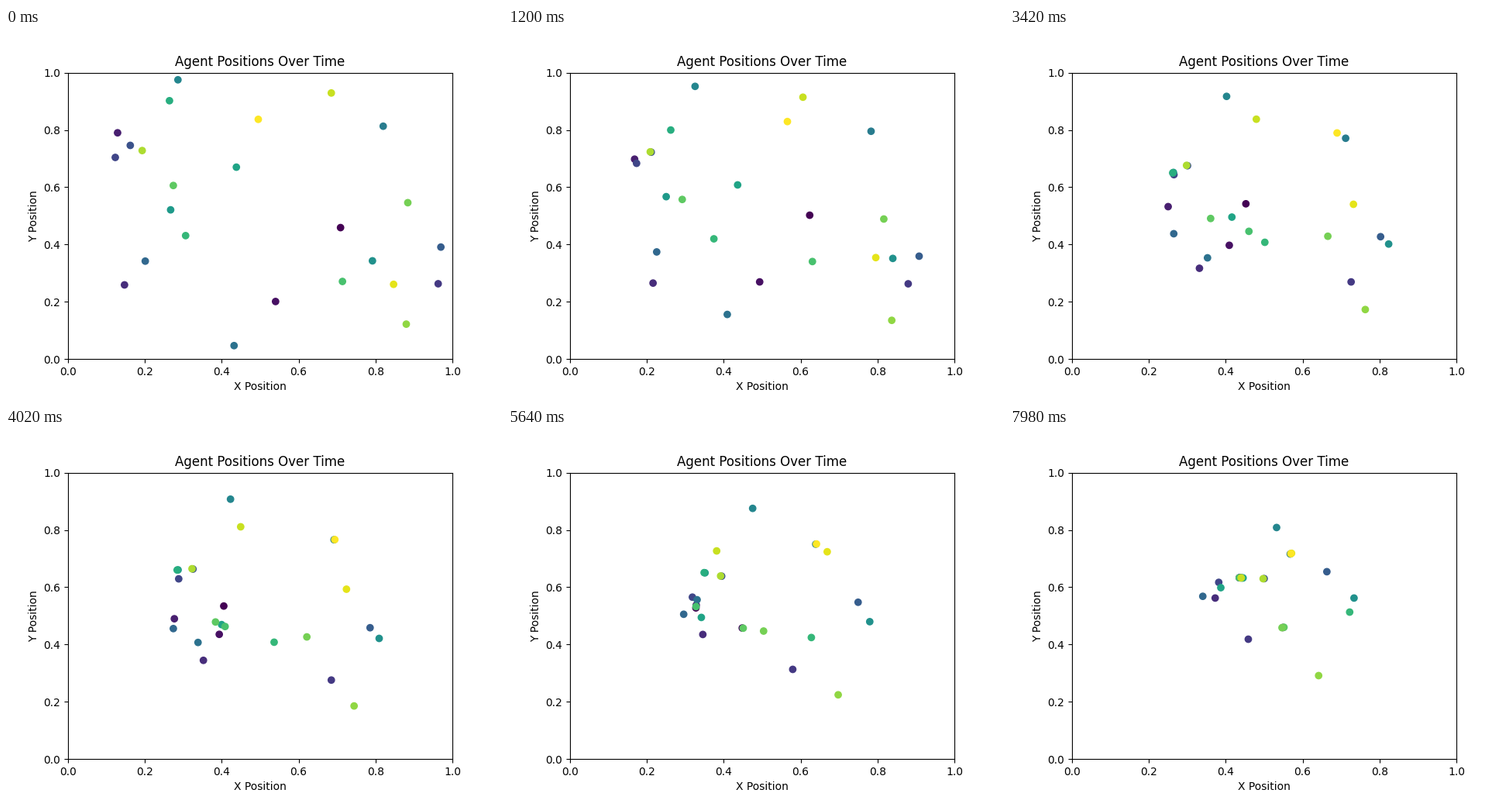
A matplotlib script for the animation above (8000 ms loop, 640 by 480 pixels).

```python
import numpy as np
import matplotlib.pyplot as plt
from matplotlib.animation import FuncAnimation

LOOP_MS, TICK_MS, STEP_MS = 8000, 20, 60

# Starting state of the pursuit: x, y, speed per 1000 steps, index of the quarry
AGENTS = np.array([
    (.709, .459, 4.79, 2), (.540, .201, 4.14, 18), (.129, .790, 5.0, 9),
    (.147, .259, 3.47, 17), (.963, .263, 4.16, 3), (.123, .704, 2.71, 0),
    (.162, .746, 2.73, 7), (.970, .391, 3.56, 23), (.201, .342, 2.02, 22),
    (.432, .047, 5.56, 15), (.820, .813, 2.04, 13), (.286, .975, 2.28, 24),
    (.792, .343, 2.43, 7), (.267, .521, 2.45, 21), (.438, .670, 3.1, 9),
    (.264, .902, 5.12, 13), (.306, .431, 3.46, 12), (.714, .271, 5.43, 2),
    (.274, .606, 2.61, 16), (.884, .546, 4.43, 1), (.880, .122, 2.25, 1),
    (.193, .728, 4.0, 6), (.685, .929, 4.03, 15), (.847, .261, 5.33, 24),
    (.495, .837, 3.55, 10),
])


def chase(steps):
    """Every agent heads straight for its quarry at its own steady speed."""
    pos, speed = AGENTS[:, :2], AGENTS[:, 2] / 1000
    quarry = AGENTS[:, 3].astype(int)
    path = [pos]
    for _ in range(steps):
        gap = pos[quarry] - pos
        dist = np.maximum(np.linalg.norm(gap, axis=1), 1e-9)
        pos = pos + gap * np.minimum(1, speed / dist)[:, None]
        path.append(pos)
    return path


path = chase(LOOP_MS // STEP_MS)

fig, ax = plt.subplots(figsize=(6.4, 4.8), dpi=100)
dots = ax.scatter(*path[0].T, c=np.arange(len(AGENTS)), cmap="viridis")
ax.set(xlim=(0, 1), ylim=(0, 1), xlabel="X Position", ylabel="Y Position",
       title="Agent Positions Over Time")


def update(tick):
    dots.set_offsets(path[tick * TICK_MS // STEP_MS])
    return (dots,)


anim = FuncAnimation(fig, update, frames=LOOP_MS // TICK_MS, interval=TICK_MS,
                     repeat=True, repeat_delay=0)
plt.show()
```
